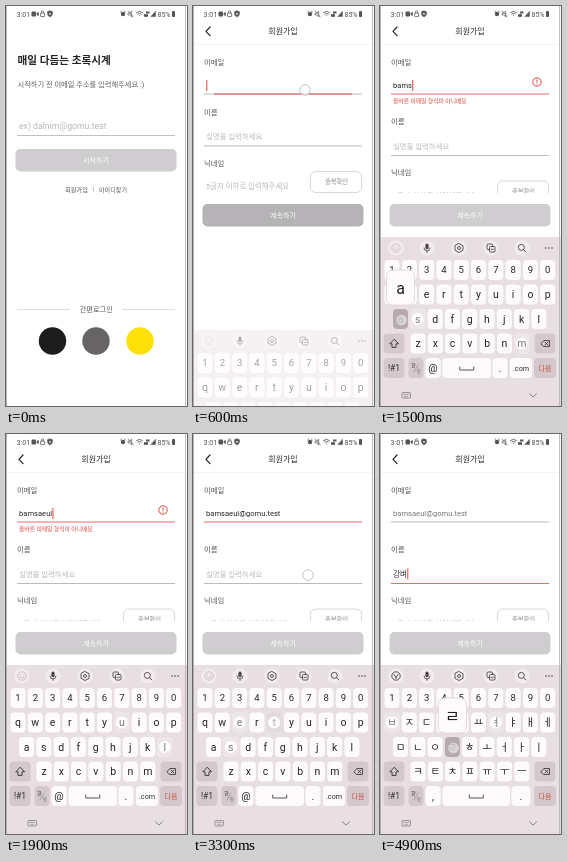
Animation, 181 px wide and 400 px high, one loop 5000 ms. Source, as an HTML page:

```html
<!DOCTYPE html>
<html lang="ko">
<head>
<meta charset="utf-8">
<style>
html, body { margin: 0; width: 100%; height: 100%; overflow: hidden; background: #fff; }
svg { display: block; width: 181px; height: 400px; font-family: Roboto, "Noto Sans CJK KR", "Noto Sans CJK", sans-serif; }
</style>
</head>
<body>
<svg id="stage" viewBox="0 0 181 400" xmlns="http://www.w3.org/2000/svg"></svg>
<script>
const stage = document.getElementById('stage');
const LOOP = 5000, STEP = 100;
const RED = '#d9483f', INK = '#303030', SOFT = '#b9b9b9';
const ruler = document.createElement('canvas').getContext('2d');

// Basic shapes
const text = (s, x, y, size, fill = INK, extra = '') =>
  `<text x="${x}" y="${y}" font-size="${size}" fill="${fill}" ${extra}>${s}</text>`;
const mid = (s, x, y, size, fill, extra = '') =>
  text(s, x, y + size * 0.36, size, fill, 'text-anchor="middle" ' + extra);
const rect = (x, y, w, h, r, fill, extra = '') =>
  `<rect x="${x}" y="${y}" width="${w}" height="${h}" rx="${r}" fill="${fill}" ${extra}/>`;
const circle = (x, y, r, fill, extra = '') =>
  `<circle cx="${x}" cy="${y}" r="${r}" fill="${fill}" ${extra}/>`;
const path = (d, color = INK, width = 1, fill = 'none') =>
  `<path d="${d}" fill="${fill}" stroke="${color}" stroke-width="${width}" stroke-linecap="round" stroke-linejoin="round"/>`;
const rule = (y, color = '#a9a9a9', x1 = 11, x2 = 169, h = 0.8) =>
  rect(x1, y - h / 2, x2 - x1, h, 0, color);
const group = (body, attrs) => `<g ${attrs}>${body}</g>`;
const touch = (x, y, alpha = 1) =>
  circle(x, y, 5.3, '#fff', `fill-opacity="${0.75 * alpha}" stroke="#b5b5b5" stroke-opacity="${alpha}" stroke-width=".8"`);

// Keyboard layouts
const rowsOf = (...rows) => rows.map(r => [...r]);
const latin = rowsOf('1234567890', 'qwertyuiop', 'asdfghjkl', 'zxcvbnm');
const hangul = rowsOf('1234567890', 'ㅂㅈㄷㄱㅅㅛㅕㅑㅐㅔ', 'ㅁㄴㅇㄹㅎㅗㅓㅏㅣ', 'ㅋㅌㅊㅍㅠㅜㅡ');
const ROW_Y = [264, 288.5, 313, 337.5, 362];
const ROW_X = [12, 12, 20.5, 38];
const PITCH = 17.3;

function keysOf(rows, korean) {
  const keys = rows.flatMap((row, r) =>
    row.map((label, i) => ({ label, x: ROW_X[r] + i * PITCH, y: ROW_Y[r], w: 15 })));
  keys.push({ label: korean ? ',' : '@', x: 53, y: ROW_Y[4], w: 15 });
  keys.push({ label: '.', x: korean ? 141 : 120, y: ROW_Y[4], w: korean ? 19 : 15 });
  return keys;
}
const latinKeys = keysOf(latin, false), hangulKeys = keysOf(hangul, true);

// Key presses; the field shows a letter one step after its press
const press = (list) => list.split(' ').map(p => ({ key: p[0], at: +p.slice(1) }));
const emailPresses = press('b1000 a1100 m1300 s1400 a1500 e1600 u1700 l1800 @2000 ' +
  'g2400 o2700 m2800 u2900 .3000 t3100 e3100 s3200 t3200');
const namePresses = press('ㄱ4100 ㅏ4200 ㅇ4300 ㅂ4700 ㅕ4800 ㄹ4900');
const nameStates = ['', 'ㄱ', '가', '강', '강ㅂ', '강벼', '강별'];
const typedCount = (list, t) => list.filter(p => p.at < t).length;

function statusBar() {
  const c = '#555';
  return text('3:01', 10.5, 10.5, 7.2, c) +
    rect(25.5, 5.5, 4.5, 5, 1, c) + path('M31 7.2l1.5-1v3.6l-1.5-1z', c, 0.5, c) +
    rect(34.6, 7, 4, 3.6, 0.6, 'none', `stroke="${c}" stroke-width=".8"`) + path('M35.5 7V5.8a1.1 1.1 0 0 1 2.2 0V7', c, 0.7) +
    path('M44 4.8l2.5 1v2.3q-.3 2-2.5 2.9q-2.2-.9-2.5-2.9V5.8z', c, 0.5, c) + circle(44, 7.8, 0.9, '#fff') +
    circle(117, 8, 2.2, c) + path('M114.6 6l1-1M119.4 6l-1-1', c, 0.8) +
    path('M122.5 7h1.2l2-1.8v5.6l-2-1.8h-1.2zM122.4 5l4.8 6', c, 0.7) +
    path('M130.5 6.5q3-2.6 6 0M131.8 8q1.7-1.4 3.4 0M133.5 9.6v.2', c, 0.9) +
    rect(138, 8.2, 4, 2.6, 0, c) + rect(140, 5.5, 3.5, 2, 0, c) +
    path('M145 10.6h4.5V5.6z', c, 0.5, c) +
    text('85%', 151.5, 10.5, 7, c) + rect(166, 5, 3, 6, 0.8, c);
}

function loginPage() {
  return text('매일 다듬는 초록시계', 11.5, 58, 10.65, '#252525', 'font-weight="700"') +
    text('시작하기 전 이메일 주소를 입력해주세요 :)', 11.5, 80.5, 7.25, '#606060') +
    text('ex) dalnim@gomu.test', 13, 123, 8.7, SOFT) + rule(129.5, '#b0b0b0') +
    rect(9.5, 143, 161, 22.5, 5, '#cfcdcf') + mid('시작하기', 90, 154.3, 7, '#fff') +
    mid('회원가입', 70.5, 183.7, 6.2, '#555') + mid('|', 87.3, 183.3, 6, '#777') + mid('아이디찾기', 107, 183.7, 6.1, '#555') +
    rule(303.5, '#d6d6d6', 11, 64) + rule(303.5, '#d6d6d6', 116, 169) +
    mid('간편로그인', 90.3, 303.5, 7.2, '#555') +
    circle(46.5, 335, 13.7, '#1c1c1c') + circle(90, 335, 13.7, '#666464') + circle(134, 335, 13.7, '#fbe107');
}

function caret(x, y) {
  return rect(x, y - 5.5, 1, 11, 0, RED);
}
function textWidth(s, size) {
  ruler.font = `${size}px Roboto, "Noto Sans CJK KR", "Noto Sans CJK", sans-serif`;
  return ruler.measureText(s).width;
}

function signupPage(t) {
  const email = emailPresses.slice(0, typedCount(emailPresses, t)).map(p => p.key).join('');
  const name = nameStates[typedCount(namePresses, t)];
  const onEmail = t >= 600 && t < 3400, onName = t >= 3400;
  const invalid = t >= 1100 && t < 3300;
  const shift = t >= 1100 ? 9.5 : 0;

  let form = text('이메일', 11, 58.7, 7.4, '#555') + rule(88, onEmail && t > 600 ? RED : '#aaa');
  if (t === 600) form += rule(88, '#e06a68', 21, 159, 1.2);
  form += text(email, 13, 82, 7.6, onName ? '#777' : '#292929');
  if (onEmail && t < 3300) form += caret(13.3 + textWidth(email, 7.6), 79.5);
  if (invalid) {
    form += text('올바른 이메일 형식이 아니에요', 13, 97, 5.8, RED) +
      circle(157, 76, 4.2, 'none', `stroke="${RED}" stroke-width="1"`) + path('M157 73.8v2.4M157 78v.1', RED, 1);
  }

  let lower = text('이름', 11, 108.7, 7.4, '#555') + rule(140, onName ? RED : '#aaa');
  lower += name ? text(name, 13, 133.5, 7.6, '#292929') : text('실명을 입력하세요', 13, 133, 7.4, SOFT);
  if (onName) lower += caret(13.3 + textWidth(name, 7.6), 130.5);
  lower += text('닉네임', 11, 159.5, 7.4, '#555') + text('5글자 이하로 입력해주세요', 13, 183, 7.45, SOFT) +
    rect(117.5, 165.5, 51, 21, 5, '#fff', 'stroke="#cfcfcf" stroke-width=".8"') + mid('중복확인', 143.5, 176, 6.3, '#888');
  form += group(lower, `transform="translate(0 ${shift})"`);

  return path('M17 21l-4 4.3l4 4.3', '#222', 1.2) +
    mid('회원가입', 90, 25.3, 8, '#292929', 'font-weight="500"') + rule(38.5, '#eee', 0, 180, 0.6) +
    group(form, 'clip-path="url(#formArea)"') +
    rect(9.5, 198, 161, 22.5, 5, t < 700 ? '#b5b3b5' : '#cfcdcf') + mid('계속하기', 90, 209.2, 7, '#fff');
}

function toolbar(t) {
  const y = 242, c = '#4b4648';
  let first = circle(16, y, 4.2, 'none', `stroke="${c}" stroke-width=".9"`);
  first += t < 4700
    ? path(`M14.5 ${y - 1.2}v.2M17.5 ${y - 1.2}v.2M13.8 ${y + 1}q2.2 2.5 4.4 0`, c, 0.9)
    : path(`M14 ${y - 1.5}l2 3l2-3M16 ${y + 1.5}v1`, c, 0.9);
  return [16, 47, 79, 111, 142].map(x => circle(x, y, 7.6, '#f3ebee')).join('') +
    group(first, `opacity="${t < 3800 ? 0.28 : 1}"`) +
    rect(45.4, y - 4.5, 3.2, 5.8, 1.6, c) + path(`M44 ${y}q0 3 3 3t3-3M47 ${y + 3}v1.5`, c, 0.8) +
    path(`M79 ${y - 4.5}l4 2.2v4.6l-4 2.2l-4-2.2v-4.6z`, c, 0.9) + circle(79, y, 1.5, 'none', `stroke="${c}" stroke-width=".9"`) +
    rect(107, y - 4, 5.5, 5.5, 1, 'none', `stroke="${c}" stroke-width=".9"`) +
    rect(109.5, y - 1.5, 5.5, 5.5, 1, '#f3ebee', `stroke="${c}" stroke-width=".9"`) + path(`M111 ${y + 1.3}h2.5`, c, 0.8) +
    circle(141.3, y - 0.6, 3, 'none', `stroke="${c}" stroke-width=".9"`) + path(`M143.6 ${y + 1.7}l2.2 2.2`, c, 1) +
    [166, 169, 172].map(x => circle(x, y, 0.8, c)).join('');
}

function keyboard(t) {
  const korean = t >= 3500;
  const keys = korean ? hangulKeys : latinKeys;
  const presses = korean ? namePresses : emailPresses;
  const keyBox = (x, y, w, fill) => rect(x - w / 2, y - 10, w, 20, 4, fill);
  const FUNC = '#d4c8cc', FACE = '#fffbfc', y5 = ROW_Y[4];
  let out = rect(0, 231, 181, 169, 0, '#e9dfe2') + toolbar(t);

  for (const k of keys) {
    out += keyBox(k.x, k.y, k.w, FACE) + mid(k.label, k.x, k.y, k.y === ROW_Y[0] ? 9.5 : 10.5, '#252324');
  }
  out += keyBox(14, ROW_Y[3], 21, FUNC) + path('M14 333.5l-4.2 4.3h2.2v3.6h4v-3.6h2.2z', INK, 0.9) +
    keyBox(165, ROW_Y[3], 21, FUNC) + path('M161 337.5l3-3h5.5v6h-5.5zM165 336l3 3M168 336l-3 3', INK, 0.8) +
    keyBox(14, y5, 21, FUNC) + mid('!#1', 14, y5, 8.5, INK) +
    keyBox(36, y5, 15, FUNC) + mid('한', 33.5, y5 - 2.5, 5, INK) + mid('영', 38.5, y5 + 3.5, 4.6, '#777') +
    path(`M34 ${y5 + 4}l4-7`, '#777', 0.5);
  const spaceEnd = korean ? 130 : 111, center = (62.5 + spaceEnd) / 2;
  out += rect(62.5, y5 - 10, spaceEnd - 62.5, 20, 4, FACE) + path(`M${center - 7} ${y5 - 1}v3h14v-3`, '#555', 1);
  if (!korean) out += keyBox(141, y5, 22, FACE) + mid('.com', 141, y5, 7.2, INK);
  out += keyBox(165, y5, 22, FUNC) + mid('다음', 165, y5, 7, '#c5523f');

  // Released keys keep a fading touch mark; the held key shows its balloon
  let balloon = '';
  for (const p of presses) {
    const age = t - p.at, k = keys.find(key => key.label === p.key);
    if (!k || age < 0 || age > 200) continue;
    if (age >= STEP) {
      out += group(rect(k.x - 7.5, k.y - 10, 15, 20, 4, '#d4c8cc') + circle(k.x, k.y, 6, '#fff'), 'opacity=".4"');
    } else {
      out += keyBox(k.x, k.y, 15, '#b6aaae') + mid(k.label, k.x, k.y, 10.5, '#777') +
        circle(k.x + 1, k.y + 1, 5.3, '#fff', 'fill-opacity=".5"');
      balloon = rect(k.x - 14, k.y - 49, 28, 35, 6, '#fffbfc', 'stroke="#d8ccd0" stroke-width=".7"') +
        mid(k.label, k.x, k.y - 30.5, 16, '#1f1d1e');
    }
  }

  out += rect(22, 386.5, 8.5, 5.5, 0.8, 'none', 'stroke="#777" stroke-width=".7"') +
    path('M23.5 388.3h5.5M24.5 390.3h3.5', '#777', 0.6) + path('M149.5 387.8l3.5 3.3l3.5-3.3', '#777', 0.9);
  return out + balloon;
}

function render(t) {
  const fade = Math.min(1, Math.max(0, (t - 100) / 300));
  let out = '<defs><clipPath id="formArea"><rect x="0" y="39" width="181" height="148"/></clipPath></defs>' +
    rect(0, 0, 181, 400, 0, '#fff');
  if (fade < 1) out += loginPage();
  if (t === 100) out += touch(71, 184);
  if (fade > 0) {
    out += group(rect(0, 0, 181, 400, 0, '#fff') + signupPage(t), `opacity="${fade}"`);
  }
  if (t === 500 || t === 600) out += touch(112, 84);
  if (t === 3300) out += touch(115, 141);
  if (t === 3400) out += touch(115, 141, 0.4);
  if (t >= 600) {
    const rise = Math.min(1, (t - 600) / 300);
    const drop = 93 * (1 - rise) ** 3;
    out += group(keyboard(t), `transform="translate(0 ${drop})" opacity="${0.42 + 0.58 * rise}"`);
  }
  out += statusBar() + rect(0, 0, 0.7, 400, 0, '#999') + rect(179.3, 0, 0.8, 400, 0, '#aaa');
  stage.innerHTML = out;
}

const start = performance.now();
let shown = -1;
function tick() {
  const t = Math.floor(((performance.now() - start) % LOOP) / STEP) * STEP;
  if (t !== shown) render(shown = t);
  requestAnimationFrame(tick);
}
tick();
</script>
</body>
</html>
```
